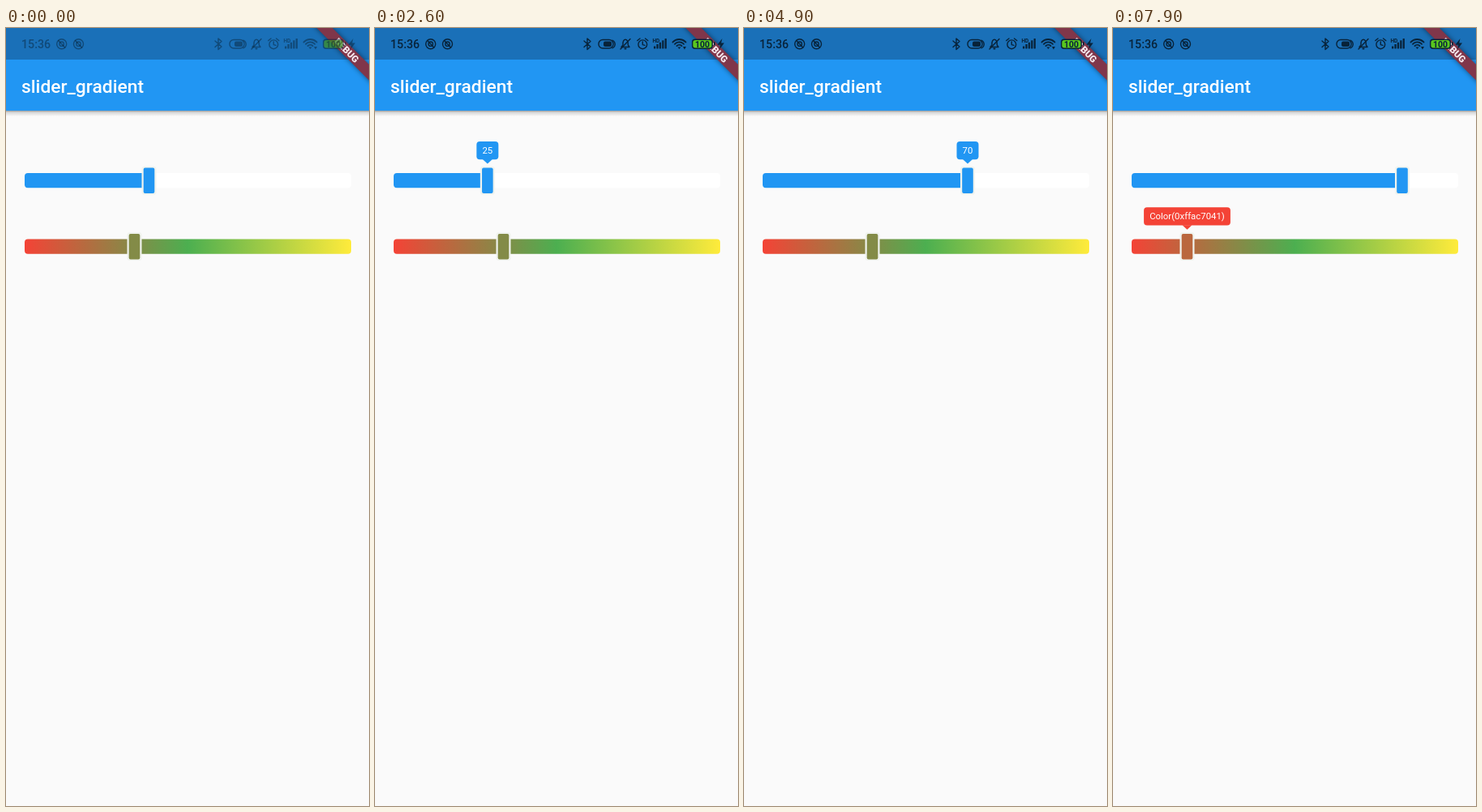
An HTML page with a canvas for the animation above (8 s loop, 448x960 px).

```html
<!DOCTYPE html>
<html lang="en">
<head>
<meta charset="utf-8">
<title>slider_gradient</title>
<style>
html, body { margin: 0; width: 100%; height: 100%; overflow: hidden; background: #fafafa; }
canvas { display: block; width: 448px; height: 960px; }
</style>
</head>
<body>
<canvas id="stage" width="448" height="960"></canvas>
<script>
const c = document.getElementById('stage').getContext('2d');
const LOOP = 8000, STEP = 100, LEFT = 23, WIDTH = 403;
const BLUE = '#2196f3', INK = '#08233a';
const RAMP = [[244, 67, 54], [76, 175, 80], [255, 235, 59]];
const FONT = 'Roboto, "Open Sans", sans-serif';

// turning points of each drag: [time, x]
const topDrag = [[2000, 176.5], [2460, 121.8], [3360, 413], [4000, 123],
  [4600, 335.3], [5100, 244.7], [5450, 357]];
const lowDrag = [[6100, 158.5], [6200, 143.7], [6850, 369], [7100, 59], [7367, 294], [7900, 91.5]];

const fraction = x => (x - LEFT) / WIDTH;
const rgb = v => `rgb(${v.map(Math.floor).join(',')})`;

// swings from one turning point to the next
function swing(turns, t) {
  const i = turns.findIndex(p => p[0] > t);
  if (i < 0) return turns[turns.length - 1][1];
  if (i === 0) return turns[0][1];
  const [t0, x0] = turns[i - 1], [t1, x1] = turns[i];
  return x0 + (x1 - x0) * Math.sin((t - t0) / (t1 - t0) * Math.PI / 2) ** 2;
}

function shade(f) {
  const i = f < 0.5 ? 0 : 1, k = f * 2 - i;
  return RAMP[i].map((v, n) => v + (RAMP[i + 1][n] - v) * k);
}

function colorName(f) {
  const hex = shade(f).map(v => Math.floor(v).toString(16).padStart(2, '0'));
  return `Color(0xff${hex.join('')})`;
}

function box(x, y, w, h, r, fill) {
  c.fillStyle = fill;
  c.beginPath();
  c.roundRect(x, y, w, h, r);
  c.fill();
}

function poly(points, fill) {
  c.beginPath();
  points.forEach(([x, y]) => c.lineTo(x, y));
  if (fill) { c.fillStyle = fill; c.fill(); } else c.stroke();
}

function arc(x, y, r, from = 0, to = Math.PI * 2) {
  c.beginPath();
  c.arc(x, y, r, from, to);
  c.stroke();
}

function write(s, x, y, font, fill, align = 'left') {
  c.font = `${font} ${FONT}`;
  c.fillStyle = fill;
  c.textAlign = align;
  c.fillText(s, x, y);
}

function statusIcons() {
  c.strokeStyle = INK;
  c.lineWidth = 1.4;
  c.lineCap = c.lineJoin = 'round';
  write('15:36', 19, 25, '500 14.2px', INK);
  for (const x of [68.7, 89.5]) {
    arc(x, 19.7, 6);
    arc(x, 19.7, 2.7);
    poly([[x - 4, 15.5], [x + 4, 24]]);
  }
  // bluetooth
  poly([[258, 16], [266, 23], [262, 26.5], [262, 13], [266, 16.5], [258, 23.5]]);
  // pill
  c.beginPath();
  c.roundRect(276, 14.5, 18, 10.5, 5);
  c.stroke();
  box(282, 16.5, 10, 6.5, 2, INK);
  arc(291, 20, 5.2, -1.2, 1.2);
  // muted bell
  c.beginPath();
  c.moveTo(304, 23.5);
  c.lineTo(306, 21);
  c.bezierCurveTo(305, 12, 313, 12, 312.3, 21);
  c.lineTo(314, 23.5);
  c.closePath();
  c.stroke();
  poly([[303, 26], [315, 13.5]]);
  box(307.5, 24.5, 3, 2, 1, INK);
  // alarm clock
  arc(330.3, 20.3, 5.4);
  poly([[330.3, 17], [330.3, 20.6], [333, 21.4]]);
  poly([[323.8, 15.5], [327, 13]]);
  poly([[333.6, 13], [336.8, 15.5]]);
  // signal
  write('HD', 342.5, 18, '700 6.5px', INK);
  for (let i = 0; i < 5; i++) box(344 + i * 3.4, 22.5 - i * 2.4, 2.3, 3 + i * 2.4, 0.4, INK);
  // wifi
  c.lineWidth = 1.8;
  for (const r of [4.2, 7.6, 11]) arc(375.5, 25, r, -Math.PI * 0.76, -Math.PI * 0.24);
  poly([[373.5, 23.5], [377.5, 23.5], [375.5, 26]], INK);
  poly([[380, 23], [384, 23], [382, 26.5]], INK);
  // battery
  box(391, 13.5, 26, 12.5, 4, INK);
  box(392.4, 14.9, 23.2, 9.7, 3, '#5ac81e');
  box(418, 17, 1.8, 5, 1, INK);
  write('100', 404, 23.6, '700 10.5px', INK, 'center');
  poly([[428.5, 13], [422.5, 20.7], [426.3, 20.7], [425, 26.5], [431, 18.6], [427.2, 18.6]], INK);
}

function banner() {
  c.save();
  c.translate(448, 0);
  c.rotate(Math.PI / 4);
  c.shadowColor = 'rgba(0,0,0,.5)';
  c.shadowBlur = 6;
  box(-52, 31.9, 104, 13.7, 0, '#80364a');
  c.shadowBlur = 0;
  write('DEBUG', 0, 43, '900 11.6px', '#f6e9ee', 'center');
  c.restore();
}

function header(t) {
  const shadow = c.createLinearGradient(0, 102, 0, 109);
  shadow.addColorStop(0, 'rgba(0,0,0,.38)');
  shadow.addColorStop(0.3, 'rgba(0,0,0,.14)');
  shadow.addColorStop(1, 'rgba(0,0,0,0)');
  box(0, 102, 448, 7, 0, shadow);
  box(0, 0, 448, 102, 0, BLUE);
  box(0, 0, 448, 39, 0, '#1a70b8');
  write('slider_gradient', 19, 79.5, '500 22.8px', '#fff');
  banner();
  c.globalAlpha = Math.min(1, 0.5 + t / 800);
  statusIcons();
  c.globalAlpha = 1;
}

function thumb(x, y, fill) {
  box(x - 9, y - 17.5, 18, 35, 3.5, '#f0f3ee');
  box(x - 6.8, y - 15.6, 13.6, 31.4, 2, fill);
}

function bubble(x, y, label, fill) {
  c.font = `11.4px ${FONT}`;
  const w = c.measureText(label).width + 14.2, left = Math.max(6, x - w / 2);
  box(left, y - 48, w, 22.3, 4, fill);
  poly([[x - 6, y - 26], [x + 6, y - 26], [x, y - 20.5]], fill);
  write(label, left + w / 2, y - 32.8, '11.4px', '#fff', 'center');
}

function draw(now) {
  const t = Math.floor(now % LOOP / STEP) * STEP, before = t - STEP;
  box(0, 0, 448, 960, 0, '#fafafa');
  header(t);

  const x1 = swing(topDrag, t);
  box(LEFT, 179, WIDTH, 18.3, 4, '#fff');
  box(LEFT, 179, x1 - LEFT, 18.3, [4, 0, 0, 4], BLUE);
  thumb(x1, 188.2, BLUE);
  if (t >= 2000 && t < 5500) {
    const value = Math.round(fraction(swing(topDrag, before)) * 100);
    bubble(x1, 188, String(value), BLUE);
  }

  const x2 = swing(lowDrag, t);
  const ramp = c.createLinearGradient(LEFT, 0, LEFT + WIDTH, 0);
  RAMP.forEach((v, i) => ramp.addColorStop(i / 2, rgb(v)));
  box(LEFT, 260.5, WIDTH, 18.3, 4, ramp);
  thumb(x2, 269.6, rgb(shade(fraction(x2))));
  if (t >= 6200) {
    bubble(x2, 269.2, colorName(fraction(swing(lowDrag, before))), rgb(RAMP[0]));
  }
}

const start = performance.now();
function tick() {
  draw(performance.now() - start);
  requestAnimationFrame(tick);
}
tick();
</script>
</body>
</html>
```
